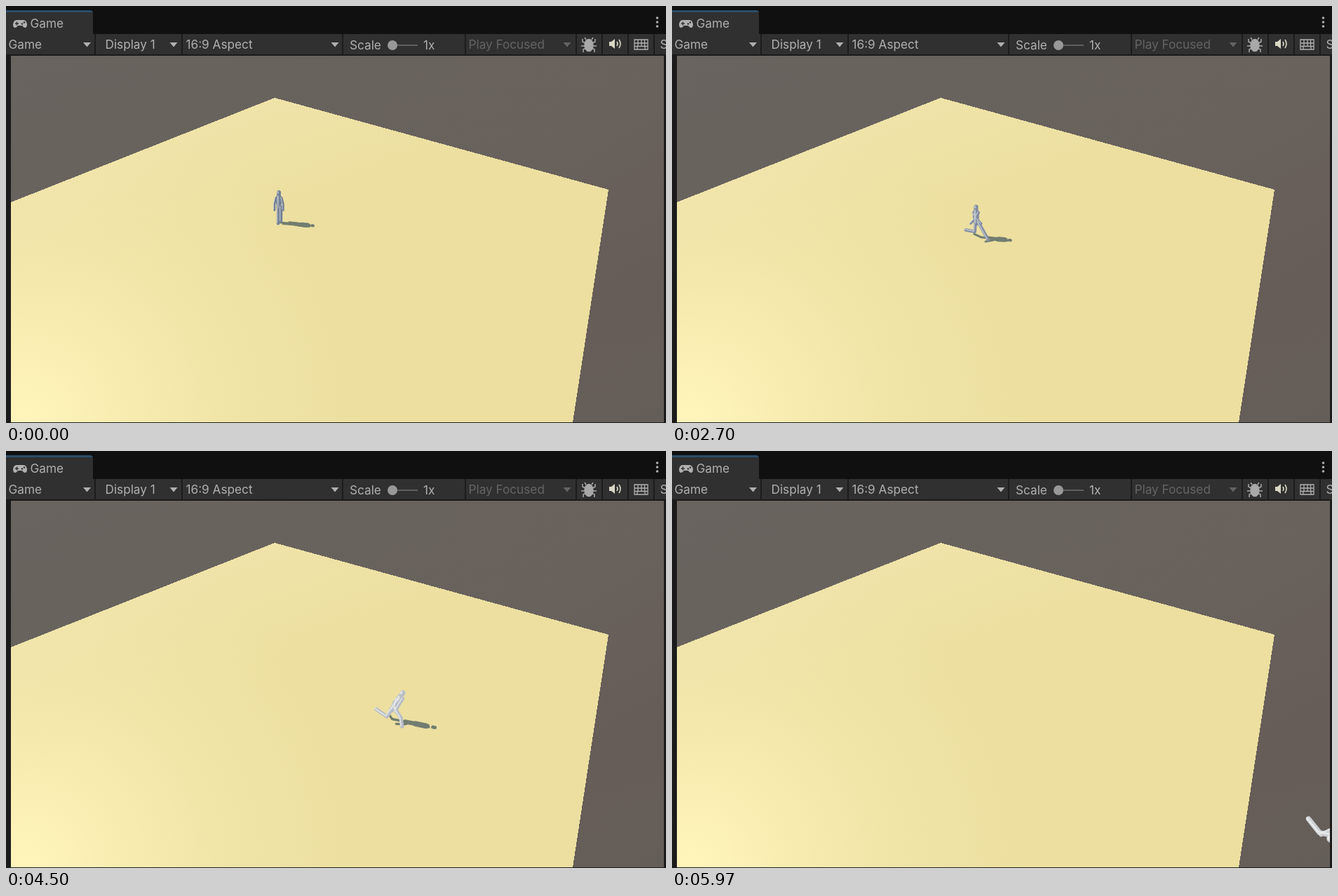
An HTML page that plays this animation: 941x595 px, repeating every 6030 ms.

```html
<!DOCTYPE html>
<html lang="en">
<head>
<meta charset="utf-8">
<title>Game view</title>
<style>
  html, body { margin: 0; width: 100%; height: 100%; overflow: hidden; background: #111; }
  svg { display: block; }
  text { font: 17.2px Inter, Roboto, sans-serif; fill: #b0b0b0; }
  .dim { fill: #646464; }
  .figure path { fill: none; stroke-linecap: round; stroke-linejoin: round; }
</style>
</head>
<body>
<svg width="941" height="595" viewBox="0 0 941 595">
  <defs>
    <linearGradient id="sky" x1="0" y1="0" x2="1" y2="1">
      <stop offset="0" stop-color="#69645f"/>
      <stop offset=".55" stop-color="#68615c"/>
      <stop offset=".78" stop-color="#675d58"/>
      <stop offset="1" stop-color="#645e59"/>
    </linearGradient>
    <radialGradient id="sand" gradientUnits="userSpaceOnUse" cx="25" cy="590" r="480">
      <stop offset="0" stop-color="#fff5bb"/>
      <stop offset=".25" stop-color="#f9edb2"/>
      <stop offset=".6" stop-color="#f0e4a7"/>
      <stop offset="1" stop-color="#ecdfa0"/>
    </radialGradient>
    <linearGradient id="farGlow" gradientUnits="userSpaceOnUse" x1="330" y1="131" x2="400" y2="320">
      <stop offset="0" stop-color="#f2e7b2" stop-opacity=".6"/>
      <stop offset="1" stop-color="#f0e4a7" stop-opacity="0"/>
    </linearGradient>
    <path id="plane" d="M7 280L383 131L859 262L808 594H7Z" shape-rendering="crispEdges"/>
    <clipPath id="view"><rect x="7" y="71" width="931" height="523"/></clipPath>
    <clipPath id="ground"><use href="#plane"/></clipPath>
  </defs>

  <rect width="941" height="595" fill="#1b1b1b"/>
  <rect width="941" height="40" fill="#101010"/>
  <path d="M0 40V6H119Q124 6 124 11V40Z" fill="#303030"/>
  <path d="M0 9V6H119Q123 6 124 9Z" fill="#2b4d6b"/>
  <rect y="40" width="941" height="29" fill="#303030"/>
  <path d="M127 40V69M251 40V69M480 40V69M655 40V69M813 40V69M850 40V69M887 40V69M924 40V69" stroke="#1c1c1c" stroke-width="2"/>

  <g fill="#b0b0b0">
    <path d="M15 20H25Q29 20 30 26Q30 31 27 31Q25 31 23 28H17Q15 31 13 31Q10 31 10 26Q11 20 15 20Z"/>
    <path d="M13 25H18M15.500 22.500V27.500" stroke="#303030" stroke-width="1.500"/>
    <circle cx="23" cy="25.500" r="1.200" fill="#303030"/><circle cx="26" cy="23.500" r="1.200" fill="#303030"/>
    <circle cx="928.500" cy="17" r="1.800"/><circle cx="928.500" cy="23" r="1.800"/><circle cx="928.500" cy="29" r="1.800"/>
    <path d="M110 52H121L115.500 58.500ZM233.500 52H244.500L239 58.500ZM463.500 52H474.500L469 58.500Z"/>
    <path class="dim" d="M794.500 52H805.500L800 58.500Z"/>
  </g>
  <text x="34.500" y="31">Game</text>
  <text x="3.500" y="61">Game</text>
  <text x="141.500" y="61">Display 1</text>
  <text x="256.500" y="61">16:9 Aspect</text>
  <text x="490" y="62">Scale</text>
  <text x="595" y="62">1x</text>
  <text x="659.500" y="61" class="dim">Play Focused</text>
  <text x="932.500" y="61">S</text>
  <path d="M551 56H587" stroke="#5f5f5f" stroke-width="2"/>
  <circle cx="551" cy="56" r="7" fill="#989898"/>

  <g stroke="#a8a8a8" stroke-width="1.500" fill="none">
    <ellipse cx="831" cy="56" rx="6" ry="8.500" fill="#a8a8a8"/>
    <path d="M827 48L825 45M835 48L837 45M826 53L822 51V47M836 53L840 51V47M826 57H820M836 57H842M827 60L823 62V66M835 60L839 62V66"/>
  </g>
  <path d="M860 51H863L868 47V61L863 57H860Z" fill="#d9d7c4"/>
  <path d="M871 51Q873 54 871 57M874 48Q878 54 874 60" fill="none" stroke="#d9d7c4" stroke-width="1.600"/>
  <path d="M896 48H915V62H896ZM896 53H915M896 57.500H915M901 48V57M906 48V57M910.500 48V57M900 57V62M911 57V62" fill="none" stroke="#b0b0b0" stroke-width="1.300"/>

  <g clip-path="url(#view)">
    <rect x="7" y="71" width="931" height="523" fill="url(#sky)"/>
    <use href="#plane" fill="url(#sand)"/>
    <use href="#plane" fill="url(#farGlow)"/>
    <g clip-path="url(#ground)"><g id="shadow" class="figure" opacity=".9"></g></g>
    <g id="body" class="figure"></g>
    <g id="light" class="figure"></g>
  </g>
</svg>

<script>
const LOOP = 6030;
const SLOPE = 0.467;   // direction of travel on screen
const TILT = 0.8;      // vertical foreshortening of the camera
const TURN = 2 * Math.PI;

const clamp = v => Math.min(1, Math.max(0, v));
const lerp = (a, b, k) => a + (b - a) * k;
const ease = (t, from, to) => {
  const k = clamp((t - from) / (to - from));
  return k * k * (3 - 2 * k);
};

// A bone from a joint; angle 0 hangs down, positive swings forward.
const bone = ([x, y], length, angle) =>
  [x + length * Math.sin(angle), y + TILT * length * Math.cos(angle)];

function leg(hip, phase, walk, sprint) {
  const s = Math.sin(phase);
  const thigh = walk * (lerp(0.25, 0, sprint) + lerp(0.3, 1.3, sprint) * s);
  const bend = walk * lerp(0.6 * (1 - s), 1.3 + 0.7 * Math.cos(phase), sprint);
  const knee = bone(hip, 13, thigh);
  const foot = bone(knee, 13, thigh - bend);
  const toGround = ([x, y]) => {
    const drop = SLOPE * walk * (x - hip[0]);
    return [x, Math.min(y + drop, drop + 2)];
  };
  return [hip, toGround(knee), toGround(foot)];
}

function arm(shoulder, side, phase, walk, sprint) {
  const upper = side * 0.2 + walk * (0.65 * Math.sin(phase) - 0.55 * sprint);
  const elbow = bone(shoulder, 11, upper);
  return [shoulder, elbow, bone(elbow, 11, upper + lerp(-0.2 * side, 0.35, sprint))];
}

function pose(t) {
  const walk = ease(t, 1450, 1760);
  const sprint = ease(t, 4050, 4900);
  const cycles = (t - 2230) / 1000 + 0.25 + 1.25 * Math.max(0, t - 4200) / 1000;
  const phase = TURN * cycles;
  const hip = [-1 - 2 * sprint, -lerp(lerp(21, 19, walk), 9.5, sprint)];
  const lean = Math.PI - 0.87 * sprint;
  const neck = bone(hip, 21, lean);
  const offset = ([x, y], dx, dy) => [x + dx, y + dy];
  return {
    legs: [
      leg(offset(hip, -1, 1), phase, walk, sprint),
      leg(offset(hip, 3, -2), phase + Math.PI, walk, sprint)
    ],
    arms: [
      arm(offset(neck, -4, 2), -1, phase + Math.PI, walk, sprint),
      arm(offset(neck, 4, 2), 1, phase, walk, sprint)
    ],
    torso: [[hip, neck]],
    chest: [[bone(hip, 10, lean), offset(neck, 0, 2)]],
    head: [[bone(neck, 5, lean), bone(neck, 7, lean)]]
  };
}

function makeFigure(id, widths) {
  const group = document.getElementById(id);
  const parts = {};
  for (const name in widths) {
    parts[name] = group.appendChild(document.createElementNS("http://www.w3.org/2000/svg", "path"));
    parts[name].setAttribute("stroke-width", widths[name]);
  }
  return (shape, color, x, y, scale, project = p => p) => {
    group.setAttribute("stroke", color);
    group.setAttribute("transform", `translate(${x} ${y}) scale(${scale})`);
    for (const name in parts) {
      const lines = shape[name].map(points => "M" + points.map(p => project(p).join(" ")).join("L"));
      parts[name].setAttribute("d", lines.join(""));
    }
  };
}

const drawShadow = makeFigure("shadow", { legs: 2.8, arms: 2.5, torso: 5, chest: 6.5, head: 4 });
const drawBody = makeFigure("body", { legs: 4.4, arms: 3, torso: 6.5, chest: 8.5, head: 6 });
const drawLight = makeFigure("light", { legs: 1.5, arms: 1.2, torso: 2, chest: 2.4, head: 2.4 });

const travel = t =>
  390 + 0.0423 * Math.max(0, t - 1650) + 172 * (Math.max(0, t - 4050) / 1150) ** 1.5;

function draw(t) {
  const x = travel(t);
  const y = 345 + SLOPE * (x - 466);
  const scale = 1 + (x - 390) / 800;
  const shape = pose(t);
  const lit = clamp((t - 2200) / 3000);
  const shade = [[116, 205], [128, 208], [151, 212]].map(([dark, bright]) => Math.round(lerp(dark, bright, lit)));

  drawShadow(shape, "#65736b", x, y, scale, ([px, py]) => [px - 1.13 * py, 0.38 * px - 0.1 * py]);
  drawBody(shape, `rgb(${shade})`, x, y, scale);
  document.getElementById("light").setAttribute("opacity", lerp(0.5, 0.9, lit));
  drawLight(shape, "#eceeec", x - 1.4 * scale, y - 0.8 * scale, scale);
}

const start = performance.now();
function tick() {
  draw((performance.now() - start) % LOOP);
  requestAnimationFrame(tick);
}
tick();
</script>
</body>
</html>
```
